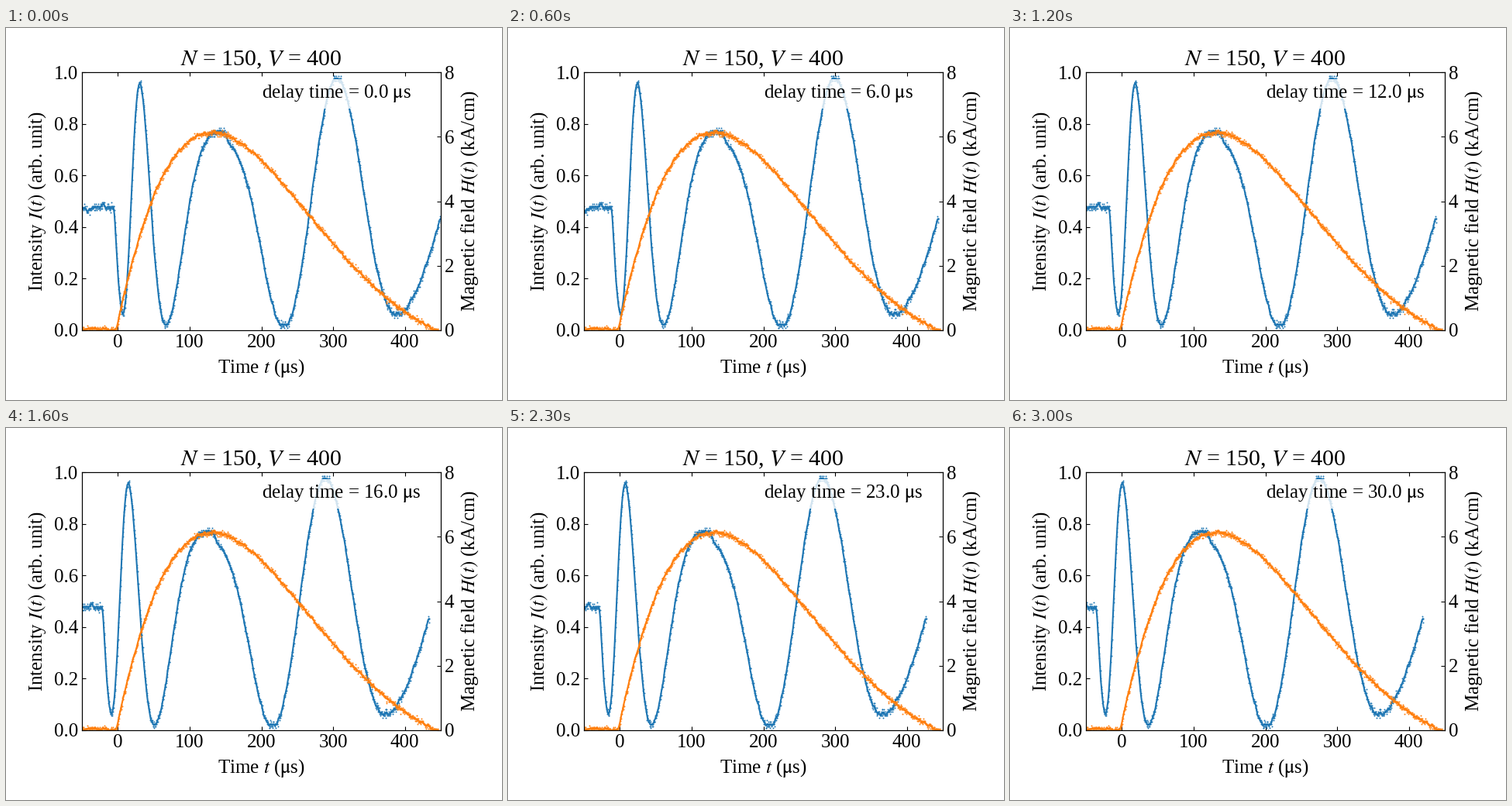
Animation of 640 by 480 pixels, one loop 3100 ms. Source, as a matplotlib script:

```python
import numpy as np
import matplotlib.pyplot as plt
from matplotlib.animation import FuncAnimation

W, H, DPI = 640, 480, 100
FRAMES, INTERVAL = 31, 100
LEFT, RIGHT, TOP, BOTTOM = 98, 561, 57, 390
BLUE, ORANGE = "C0", "C1"
MICRO = r"$\mathrm{\mu}$s"

plt.rcParams.update({
    "font.family": "Liberation Serif",
    "mathtext.fontset": "stix",
    "font.size": 18,
    "xtick.direction": "in",
    "ytick.direction": "in",
})

rng = np.random.default_rng(7)
t = np.arange(-50, 450.01, 0.4)


def hermite(x, xk, yk):
    """Smooth curve through the knots."""
    xk, yk = np.array(xk, float), np.array(yk, float)
    slope = np.gradient(yk, xk)
    i = np.clip(np.searchsorted(xk, x) - 1, 0, len(xk) - 2)
    h = xk[i + 1] - xk[i]
    s = np.clip((x - xk[i]) / h, 0, 1)
    return ((2 * s**3 - 3 * s**2 + 1) * yk[i]
            + (s**3 - 2 * s**2 + s) * h * slope[i]
            + (3 * s**2 - 2 * s**3) * yk[i + 1]
            + (s**3 - s**2) * h * slope[i + 1])


def bump(center, width, height):
    return height * np.exp(-((t - center) / width) ** 2)


def smooth(y, n):
    padded = np.pad(y, n // 2, mode="edge")
    return np.convolve(padded, np.ones(n) / n, mode="valid")


def quantize(y, step):
    return np.round(y / step) * step


def intensity():
    half = np.pi / 2
    phase = hermite(
        t,
        [-5, 7, 30.5, 67, 86, 102, 120, 133, 148, 163, 181,
         231, 305.5, 390, 450],
        [0.045, half, 3 * half, 5 * half, 8.85, 9.49, 9.91, 10.03, 10.02,
         9.87, 9.56, 5 * half, 3 * half, half, 0.125])
    amp = np.interp(t, [7, 31, 67, 231, 306, 390],
                    [0.43, 0.46, 0.477, 0.48, 0.48, 0.433])
    y = 0.495 - amp * np.sin(phase)
    y += bump(-21, 2.5, 0.015) + bump(-42, 4, -0.006)
    y += bump(148, 3, 0.008) + bump(156, 4, -0.018)
    return y


def field():
    s = np.maximum(t + 2, 0)
    return 14.97 * np.exp(-0.00516 * s) * np.sin(np.pi * s / 443)


raw_i = quantize(intensity() + rng.normal(0, 0.008, t.size), 0.008)
raw_h = quantize(field() + 0.03 + rng.normal(0, 0.045, t.size), 0.05)
line_i, line_h = smooth(raw_i, 7), smooth(raw_h, 11)

fig = plt.figure(figsize=(W / DPI, H / DPI), dpi=DPI)
ax = fig.add_axes([LEFT / W, 1 - BOTTOM / H,
                   (RIGHT - LEFT) / W, (BOTTOM - TOP) / H])
ax2 = ax.twinx()

dot = dict(ls="none", marker="o", ms=1.4, mew=0)
dots, = ax.plot(t, raw_i, color=BLUE, **dot)
curve, = ax.plot(t, line_i, color=BLUE, lw=1.5)
ax2.plot(t, raw_h, color=ORANGE, **dot)
ax2.plot(t, line_h, color=ORANGE, lw=1.5)

ax.set(xlim=(-50, 450), ylim=(0, 1), xticks=range(0, 401, 100))
ax2.set(ylim=(0, 8), yticks=range(0, 9, 2))
ax.tick_params(axis="x", top=True)
ax.set_title("$N$ = 150, $V$ = 400")


def axis_label(x, y, text, angle=0):
    fig.text(x / W, 1 - y / H, text, rotation=angle, rotation_mode="anchor",
             ha="center", va="baseline")


axis_label(329.5, 445, f"Time $t$ ({MICRO})")
axis_label(47, 223.5, "Intensity $I(t)$ (arb. unit)", 90)
axis_label(604.5, 223, "Magnetic field $H(t)$ (kA/cm)", 90)

note = ax.text(200, 0.9, "", bbox=dict(fc="white", ec="none", alpha=0.8))


def update(i):
    delay = float(i)
    dots.set_xdata(t - delay)
    curve.set_xdata(t - delay)
    note.set_text(f"delay time = {delay:.1f} {MICRO}")
    return dots, curve, note


anim = FuncAnimation(fig, update, frames=FRAMES, interval=INTERVAL,
                     repeat=True, repeat_delay=0)
plt.show()
```
